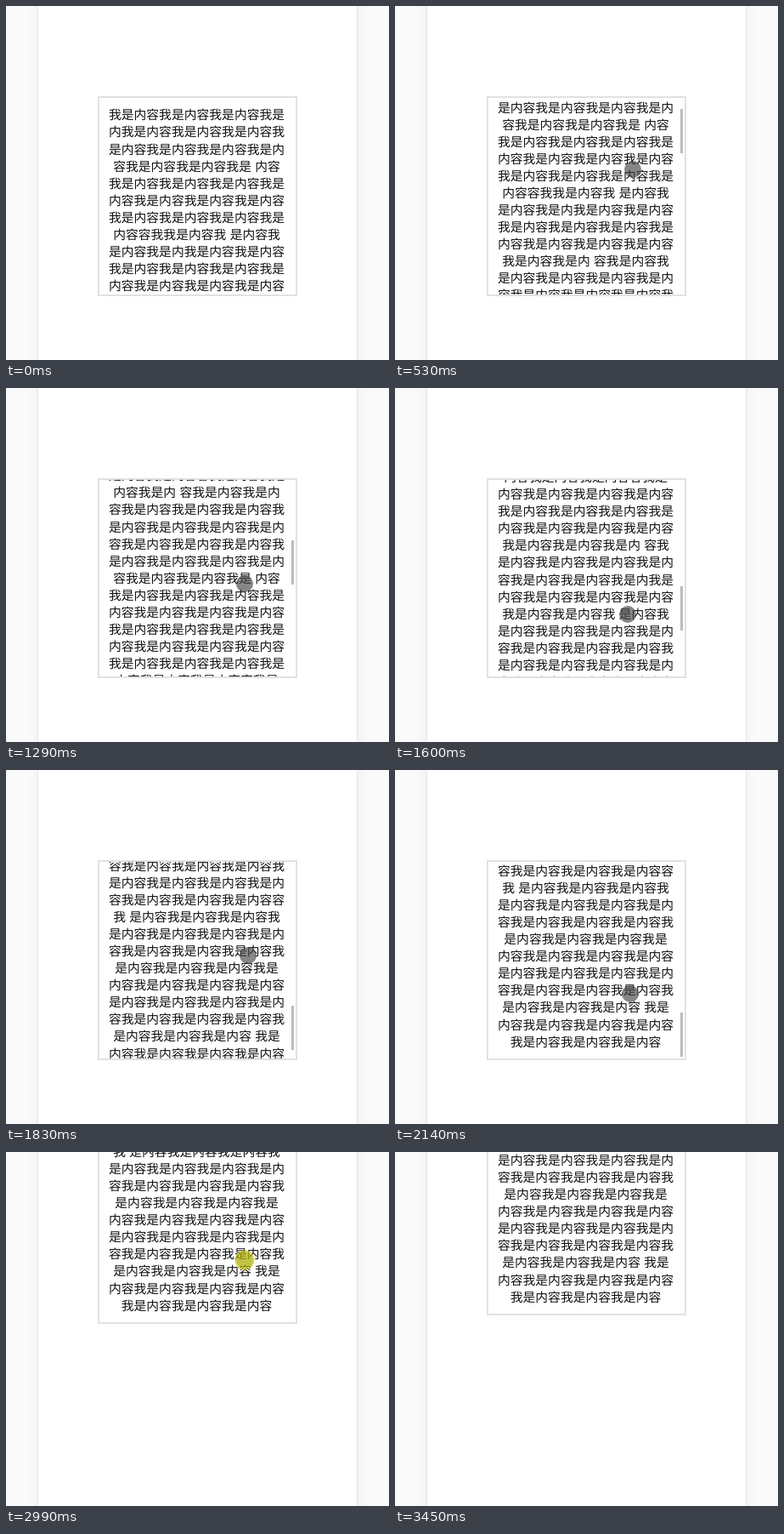
Recreate the animation shown at these times as an HTML page. Size 451 by 416 pixels, loop 4000 ms.

```html
<!DOCTYPE html>
<html lang="zh-CN">
<head>
<meta charset="utf-8">
<title>Scroll area</title>
<style>
  html, body { margin: 0; width: 100%; height: 100%; overflow: hidden; background: #fafafa; }
  body { position: relative; }
  #page {
    position: absolute; left: 37px; top: -20px; bottom: -20px; width: 375px;
    background: #fff; border: solid #e4e4e4; border-width: 0 1px;
    box-shadow: 0 0 16px rgba(0, 0, 0, .05);
  }
  #box {
    position: absolute; left: 108px; top: 106px; width: 231px; height: 231px;
    border: 2px solid #e1e1e1; overflow: hidden; background: #fff;
  }
  #text {
    position: absolute; left: -1px; top: 10px; width: 231px;
    font: 14.8px/20px "Noto Sans CJK SC", "Noto Sans CJK JP", "Noto Sans CJK", sans-serif;
    color: #111; text-align: center; white-space: nowrap; word-spacing: 1px;
    text-rendering: geometricPrecision;
  }
  #text div { position: absolute; width: 100%; }
  #bar { position: absolute; left: 226px; top: 2px; width: 3px; height: 52px; background: #bbb; }
  #dot {
    position: absolute; left: -10px; top: -10px; width: 20px; height: 20px;
    border-radius: 50%; background: rgba(65, 65, 65, .64);
  }
  #dot.down {
    background: rgba(175, 175, 10, .75);
    box-shadow: 0 0 0 1.5px rgba(205, 205, 30, .75);
  }
</style>
</head>
<body>
<div id="page"></div>
<div id="box"><div id="text"></div><div id="bar"></div></div>
<div id="dot"></div>
<script>
  const LOOP = 4000, STEP = 1000 / 13, LEAD = 17;   // the picture advances 13 times a second
  const PITCH = 20.067, MAX_SCROLL = 772, LIFT = 149;
  const $ = id => document.getElementById(id);
  const box = $('box'), text = $('text'), bar = $('bar'), dot = $('dot');

  // Full lines, named by their first character
  const full = {};
  [...'我是内容'].forEach((c, i) => full[c] = '我是内容'.repeat(5).slice(i, i + 14));

  const lines = `我|内我是内容我是内容我是内容我|是|容我是内容我是内容我是 内容|我|内|我
内容容我我是内容我 是内容我|是内容我是内我是内容我是内容|我|内|我是内容我是内 容我是内容我|是|容
是内容我是内容容我是内容我是|内容我是内 容我是内容我是内|容|是|容|是
容我是内容我是内容我是 内容|我|内|我|内|我|内容我是内容我是内容容我是|内|我|内
我是内容我是内容我是内 容我|是|容我是内容我是内容我是内我是|内|我是内容我是内容我 是内容我
是|容|是|容我是内容我是内容我是内容容|我 是内容我是内容我是内容我|是|容
是内容我是内容我是内容我是|内|是|容|是内容我是内容我是内容 我是|内|我是内容我是内容我是内容`.split(/[|\n]/);

  lines.forEach((s, i) => {
    const row = text.appendChild(document.createElement('div'));
    row.textContent = full[s] || s;
    row.style.top = Math.round(i * PITCH + .4) + 'px';
  });

  const clamp = u => Math.min(1, Math.max(0, u));
  const easeOut = u => 1 - (1 - clamp(u)) ** 2;
  const easeInOut = u => (1 - Math.cos(Math.PI * clamp(u))) / 2;

  // Three flicks of seven steps, each stronger than the last
  const flicks = [100, 224, 451];
  const scrollAt = k => Math.min(MAX_SCROLL,
    flicks.reduce((sum, d, i) => sum + d * easeOut((k - 5 - 7 * i) / 7), 0));

  const liftAt = k => LIFT * easeInOut((k - 34.1) / 5.9);

  // Pointer rests: step, x, y (y before the page is dragged up)
  const rests = [[1, 332, 345], [3, 280, 252], [5, 280, 252], [7, 280, 192], [13, 287, 194],
    [21, 274, 266], [26, 291, 193], [28, 277, 263], [34, 280, 266], [42, 281, 266], [44, 318, 395]];

  function pointerAt(k) {
    const i = Math.max(1, rests.findIndex(r => r[0] >= k));
    const [ka, xa, ya] = rests[i - 1], [kb, xb, yb] = rests[i];
    const u = easeInOut((k - ka) / (kb - ka));
    return [xa + (xb - xa) * u, ya + (yb - ya) * u - liftAt(k)];
  }

  const move = (el, x, y) => el.style.transform = `translate(${Math.round(x)}px, ${Math.round(y)}px)`;

  function draw(k) {
    const y = scrollAt(k);
    move(text, 0, -y);
    move(bar, 0, y * .2264);
    bar.style.opacity = k < 6 ? 0 : clamp((33 - k) / 3);
    move(box, 0, -liftAt(k));
    dot.style.display = k >= 1 && k < 45 ? '' : 'none';
    dot.className = k >= 35 && k <= 40 ? 'down' : '';
    move(dot, ...pointerAt(k));
  }

  const start = performance.now();
  function tick() {
    const t = (performance.now() - start) % LOOP;
    draw(Math.floor((t + LEAD) / STEP));
    requestAnimationFrame(tick);
  }
  tick();
</script>
</body>
</html>
```
